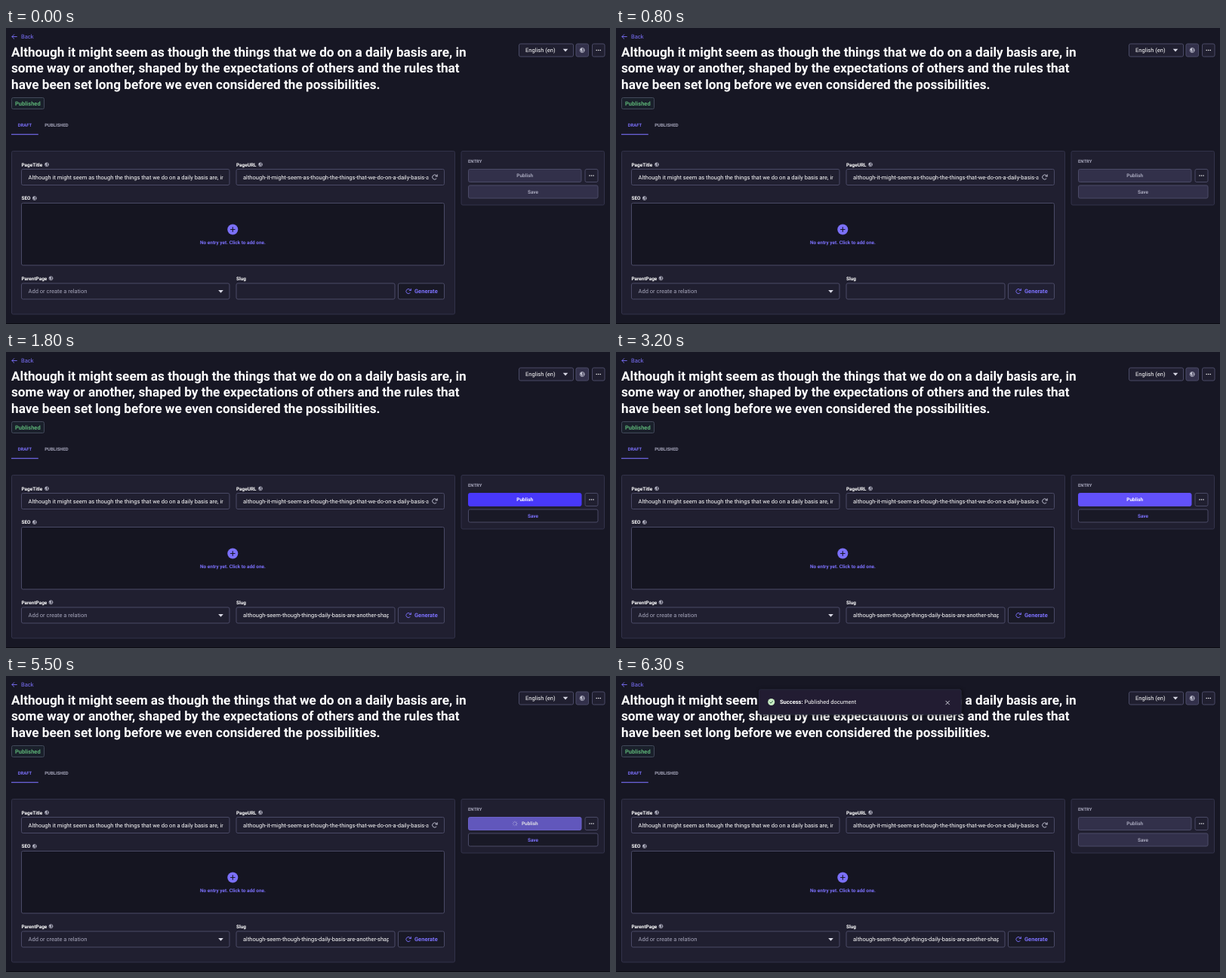
These frames come from a looping animation (800 by 393 pixels, 7.5 s). An HTML page:

```html
<!DOCTYPE html>
<html lang="en">
<head>
<meta charset="utf-8">
<title>Entry editor</title>
<style>
:root {
  --bg: #171724; --panel: #201f30; --line: #32324a; --edge: #4a4a66;
  --off: #32304a; --grey: #a5a5ba; --accent: #7b70fa; --main: #4838fb; --hover: #7b6dfb;
}
html, body { margin: 0; width: 100%; height: 100%; overflow: hidden; background: var(--bg); }
svg { display: block; width: 100vw; height: 100vh; }
text { font: 7.53px Roboto, Arial, sans-serif; fill: #fff; text-rendering: geometricPrecision; white-space: pre; }
.b { font-weight: 700; }
.h1 { font-size: 17.2px; font-weight: 700; }
.label { font-size: 6.45px; font-weight: 700; }
.caps { font-size: 5.9px; font-weight: 700; }
.mid { text-anchor: middle; }
.grey { fill: var(--grey); }
.accent { fill: var(--accent); }
.panel { fill: var(--panel); stroke: var(--line); }
.field { fill: var(--panel); stroke: var(--edge); }
.off { fill: var(--off); stroke: var(--edge); }
.stroke { fill: none; stroke: var(--accent); stroke-linecap: round; stroke-linejoin: round; }
.icon { color: #c6c6d6; }

.gen, .pub, .pubText, .save, .saveText, .slug, .idle, .busy, .toast { animation: 7500ms linear infinite; }
.gen { stroke: var(--edge); animation-name: gen; }
.pub { animation-name: pub; }
.pubText { animation-name: pubText; }
.save { stroke: var(--edge); animation-name: save; }
.saveText { animation-name: saveText; }
.slug { animation-name: slug; animation-timing-function: step-end; }
.idle { animation-name: idle; animation-timing-function: step-end; }
.busy { animation-name: busy; animation-timing-function: step-end; }
.toast { animation-name: toast; }
.spin { transform-origin: 674px 196px; animation: spin 1s linear infinite; }

@keyframes gen {
  0%, 1.4% { fill: #191926; }
  4%, 33% { fill: #212033; }
  35.5%, 100% { fill: #191926; }
}
@keyframes pub {
  0%, 18.6% { fill: var(--off); stroke: var(--edge); }
  21%, 41% { fill: var(--main); stroke: var(--main); }
  43.6% { fill: #715ffb; stroke: #715ffb; }
  45.3%, 72.6% { fill: var(--hover); stroke: var(--hover); }
  74.7%, 100% { fill: var(--off); stroke: var(--edge); }
}
@keyframes pubText {
  0%, 18.6% { fill: var(--grey); }
  21%, 72.6% { fill: #fff; }
  74.7%, 100% { fill: var(--grey); }
}
@keyframes save {
  0%, 18.6% { fill: var(--off); }
  21%, 80% { fill: #191926; }
  82.6%, 100% { fill: var(--off); }
}
@keyframes saveText {
  0%, 18.6% { fill: var(--grey); }
  21%, 80% { fill: var(--accent); }
  82.6%, 100% { fill: var(--grey); }
}
@keyframes slug { 0% { opacity: 0; } 18.6%, 100% { opacity: 1; } }
@keyframes idle { 0% { opacity: 1; } 72.6% { opacity: 0; } 80%, 100% { opacity: 1; } }
@keyframes busy { 0% { opacity: 0; } 72.6% { opacity: 1; } 80%, 100% { opacity: 0; } }
@keyframes toast { 0%, 79.9% { opacity: 0; } 81.3%, 100% { opacity: 1; } }
@keyframes spin { to { transform: rotate(360deg); } }
</style>
</head>
<body>
<svg viewBox="0 0 800 393">
  <defs>
    <g id="globe">
      <circle r="2.5" fill="none" stroke="currentColor" stroke-width=".7"/>
      <path d="M-2.3-.8L-.6-2.3L.5-1.2L-.3 0L.8.7L-.2 2.3L-1.2.8Z M1-.8L2.3-.6L2 1L1.2.4Z" fill="currentColor"/>
    </g>
    <g id="dots" fill="#fff">
      <circle cx="-2.5" r=".75"/><circle r=".75"/><circle cx="2.5" r=".75"/>
    </g>
    <g id="reload" fill="none" stroke="currentColor" stroke-width=".9" stroke-linecap="round" stroke-linejoin="round">
      <path d="M2.2 2.2A3.1 3.1 0 1 1 2.2-2.2L3.3-1.1M3.4-3.3V-1H1.1"/>
    </g>
    <path id="caret" d="M-3.3-1.7H3.3L0 1.9Z" fill="#d8d8e4"/>
    <clipPath id="clipTitle"><rect x="29" y="188" width="258.5" height="20"/></clipPath>
    <clipPath id="clipUrl"><rect x="313" y="188" width="246.5" height="20"/></clipPath>
    <clipPath id="clipSlug"><rect x="313" y="340" width="193.5" height="20"/></clipPath>
    <filter id="shade" x="-10%" y="-50%" width="120%" height="200%">
      <feDropShadow dx="1" dy="1" stdDeviation="2.5" flood-color="#0a0a12" flood-opacity=".6"/>
    </filter>
  </defs>

  <rect width="800" height="393" fill="var(--bg)"/>
  <rect y="392" width="800" height="1" fill="#0b0b13"/>

  <!-- header -->
  <path class="stroke" d="M14.3 11.5H8M10.7 8.7L7.9 11.5L10.7 14.3" stroke-width=".9"/>
  <text class="accent" x="20" y="14.2">Back</text>
  <text class="h1" x="7" y="37.7">Although it might seem as though the things that we do on a daily basis are, in</text>
  <text class="h1" x="7" y="59.2">some way or another, shaped by the expectations of others and the rules that</text>
  <text class="h1" x="7" y="80.7">have been set long before we even considered the possibilities.</text>
  <rect x="7.5" y="92.5" width="43" height="15" rx="2" fill="#1a202b" stroke="#42495a"/>
  <text class="b" x="12" y="102.8" style="fill:#5cb176">Published</text>

  <rect class="field" x="679.5" y="21" width="72" height="17" rx="2"/>
  <text x="688" y="32.2">English (en)</text>
  <use href="#caret" x="741" y="29.5"/>
  <rect class="off" x="755" y="21" width="16.5" height="17" rx="2"/>
  <use href="#globe" class="icon" transform="translate(763.2 29.5) scale(1.2)"/>
  <rect class="field" x="776.5" y="21" width="16.5" height="17" rx="2"/>
  <use href="#dots" x="784.7" y="29.6"/>

  <!-- tabs -->
  <text class="caps accent" x="15.7" y="131">DRAFT</text>
  <rect x="7" y="140.7" width="35.8" height="1.1" fill="var(--accent)"/>
  <text class="caps grey" x="51.3" y="131">PUBLISHED</text>

  <!-- form -->
  <rect class="panel" x="7.5" y="163.5" width="587" height="216.5" rx="2"/>

  <text class="label" x="20.5" y="183.6">PageTitle</text>
  <use href="#globe" class="icon" x="54" y="181.3"/>
  <rect class="field" x="20.5" y="187.5" width="275.5" height="21" rx="2"/>
  <g clip-path="url(#clipTitle)">
    <text x="29.6" y="200.6">Although it might seem as though the things that we do on a daily basis are, in some way</text>
  </g>

  <text class="label" x="305" y="183.6">PageURL</text>
  <use href="#globe" class="icon" x="337" y="181.3"/>
  <rect class="field" x="305" y="187.5" width="275.5" height="21" rx="2"/>
  <g clip-path="url(#clipUrl)">
    <text x="314" y="200.6">although-it-might-seem-as-though-the-things-that-we-do-on-a-daily-basis-are-in-some</text>
  </g>
  <use href="#reload" class="icon" x="567.8" y="198"/>

  <text class="label" x="20.5" y="228.3">SEO</text>
  <use href="#globe" class="icon" x="37.8" y="226"/>
  <rect x="20.5" y="232.5" width="560" height="82.5" rx="2" fill="#151521" stroke="var(--edge)"/>
  <circle cx="300.3" cy="267.5" r="7" fill="var(--accent)"/>
  <path d="M297.1 267.5H303.5M300.3 264.3V270.7" stroke="#171724" stroke-width="1.1"/>
  <text class="label accent mid" x="300.5" y="287">No entry yet. Click to add one.</text>

  <text class="label" x="20.5" y="334.5">ParentPage</text>
  <use href="#globe" class="icon" x="59.5" y="332.3"/>
  <rect class="field" x="20.5" y="339" width="275.5" height="21" rx="2"/>
  <text class="grey" x="29.6" y="352">Add or create a relation</text>
  <use href="#caret" x="284.5" y="349.8"/>

  <text class="label" x="305" y="334.5">Slug</text>
  <rect class="field" x="305" y="339" width="210" height="21" rx="2"/>
  <g clip-path="url(#clipSlug)">
    <text class="slug" x="314" y="352.2">although-seem-though-things-daily-basis-are-another-shaped-expectations</text>
  </g>
  <rect class="gen" x="519.5" y="339" width="61" height="21" rx="2"/>
  <use href="#reload" style="color:var(--accent)" x="533" y="349.6"/>
  <text class="b accent" x="541" y="352.2">Generate</text>

  <!-- side panel -->
  <rect class="panel" x="603" y="163.5" width="189.5" height="71.5" rx="2"/>
  <text class="caps grey" x="612" y="178.8">ENTRY</text>
  <rect class="pub" x="612.5" y="187.5" width="149.5" height="17" rx="2"/>
  <g class="idle"><text class="label mid pubText" x="687.2" y="198.3">Publish</text></g>
  <g class="busy">
    <g class="spin" id="spinner"></g>
    <text class="label mid pubText" x="693.8" y="198.3">Publish</text>
  </g>
  <rect class="field" x="767" y="187.5" width="17" height="17" rx="2"/>
  <use href="#dots" x="775.5" y="196"/>
  <rect class="save" x="612.5" y="209" width="171.5" height="17" rx="2"/>
  <text class="label mid saveText" x="698" y="219.8">Save</text>

  <!-- notice -->
  <g class="toast">
    <rect x="189.5" y="18" width="267.5" height="33" rx="2" fill="#201f30" stroke="#28283c" filter="url(#shade)"/>
    <circle cx="205.7" cy="34.5" r="4.5" fill="#c9ecc4"/>
    <path d="M203.6 34.6L205.1 36.1L207.8 33.2" fill="none" stroke="#2f6846" stroke-width="1"/>
    <text x="217" y="37.1"><tspan class="b">Success:</tspan> Published document</text>
    <path d="M436.6 32.9L441.8 38.1M441.8 32.9L436.6 38.1" stroke="#e4e4ee" stroke-width=".9"/>
  </g>
</svg>
<script>
const spinner = document.getElementById('spinner');
for (let i = 0; i < 8; i++) {
  const ray = document.createElementNS('http://www.w3.org/2000/svg', 'path');
  ray.setAttribute('d', 'M674 194.3V192.7');
  ray.setAttribute('stroke', '#dcdcf0');
  ray.setAttribute('stroke-width', '.8');
  ray.setAttribute('opacity', 0.4 + i * 0.08);
  ray.setAttribute('transform', `rotate(${i * 45} 674 196)`);
  spinner.append(ray);
}
</script>
</body>
</html>
```
